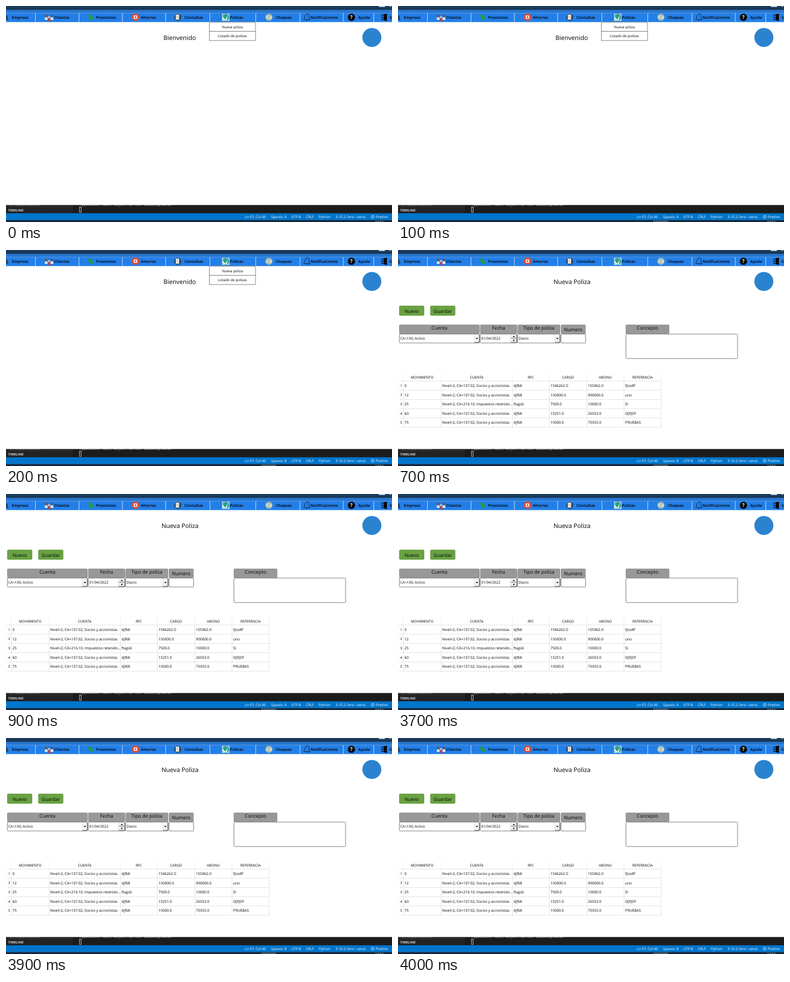
Animation of 690 by 388 pixels, one loop 8000 ms. Source, as an HTML page:

```html
<!DOCTYPE html>
<html lang="es">
<head>
<meta charset="utf-8">
<style>
html, body { margin: 0; width: 100%; height: 100%; overflow: hidden; background: #fff; }
svg { display: block; width: 690px; height: 388px; font-family: "Open Sans", "Noto Sans", sans-serif; text-rendering: geometricPrecision; }
</style>
</head>
<body>
<svg id="stage" viewBox="0 0 690 388"></svg>
<script>
const rect = (x, y, w, h, fill, extra = '') =>
  `<rect x="${x}" y="${y}" width="${w}" height="${h}" fill="${fill}" ${extra}/>`;
const circle = (x, y, r, fill, extra = '') => `<circle cx="${x}" cy="${y}" r="${r}" fill="${fill}" ${extra}/>`;
const path = (d, fill, extra = '') => `<path d="${d}" fill="${fill}" ${extra}/>`;
const line = (d, color, width = 1) => path(d, 'none', `stroke="${color}" stroke-width="${width}"`);
// y is the middle of the capital letters
const text = (x, y, size, str, extra = '', fill = '#000') =>
  `<text x="${x}" y="${y + size * 0.355}" font-size="${size}" fill="${fill}" ${extra}>${str}</text>`;
const mid = 'text-anchor="middle"';

function editor() {
  const mono = 'font-family="Noto Sans Mono, monospace"';
  const status = [[-3, '0'], [427, 'Ln 97, Col 60'], [474, 'Spaces: 8'], [510, 'UTF-8'],
    [536, 'CRLF'], [559, 'Python'], [589, "3.10.2 ('env': venv)"], [661, 'Prettier']];
  return rect(0, 350, 690, 24, '#1c1c1c') + rect(0, 350, 121, 24, '#222324') +
    text(7, 357, 6.2, 'x Process memory', '', '#999') +
    text(131, 357, 6.4, 'TypeError: dict  object is not subscriptable', mono, '#bbb') +
    line('M0 360.5H121', '#3c3c3c', .7) + line('M121 358V373', '#111') +
    text(4, 366.5, 5.8, 'TIMELINE', 'font-weight="700"', '#ddd') +
    rect(131.3, 361.5, 3, 9, 'none', 'stroke="#ddd" stroke-width=".8"') +
    rect(0, 372.3, 690, 12.5, '#0075cc') +
    status.map(([x, s]) => text(x, 378.7, 6.35, s, 'font-weight="500"', '#fff')).join('') +
    circle(655.5, 378.7, 2.7, 'none', 'stroke="#fff" stroke-width=".7"') + line('M653.6 380.6L657.4 376.8', '#fff', .7) +
    rect(0, 384.5, 690, 4, '#10263c') + text(660, 388.3, 6, '10:51', '', '#ddd');
}

function icons() {
  const person = (x, y, skin, coat) =>
    circle(x, y, 2, skin) + path(`M${x - 2.8} ${y + 7}q0-5 2.8-5t2.8 5z`, coat);
  return path('M0 16l2 1v2l2 1-1 2 1 3H0z', '#24405c') +
    person(72, 18, '#6b4a3c', '#d8e6f3') + person(82, 18, '#6b4a3c', '#d8e6f3') + person(77, 20, '#e8b89b', '#c23f3f') +
    path('M146 16q6-1 8 3l3 3-2 3q-6-1-7-4z', '#22a34a') + line('M146 16l8 7', '#13703a', .8) +
    circle(231.5, 20, 6.7, '#e2492f') + rect(228.5, 17, 6, 6, '#fff') + rect(230, 18.5, 3, 3, '#e2492f') +
    circle(307, 20.3, 6.3, '#30414f') + rect(303.5, 15.5, 6, 9, '#f3f3f3') + line('M305 18h3M305 20h3M305 22h3', '#777', .6) +
    rect(386, 14, 13.5, 13, '#a9d3e6') + circle(392.7, 20.5, 6, '#2aa18b') + path('M388 17q0 7 5 7l3-7-1 8q-6 2-8-3z', '#fff') +
    circle(470, 20.3, 6.3, '#a9bcb0') + rect(465.5, 18, 9, 4.5, '#e9eadc') + line('M467 19.5h6M467 21h4', '#4b8a83', .7) +
    line('M532 24.5q2-2 2-5t4-5 4 5 2 5zM536.5 25q1.5 2 3 0M538 14.5v-1.5', '#152c4a', 1) +
    circle(617.5, 20.3, 6.5, '#080808') + text(617.5, 20.3, 9, '?', mid + ' font-weight="700"', '#fff') +
    path('M675 15l6-1.5v13.5l-6-1.5z', '#0b0b0b') + line('M675 16h-3v2.5M672 22v2.5h3M670.5 20.3h4', '#0b0b0b', 1.2);
}

function navbar() {
  const items = [[10.5, 'Empresa'], [86, 'Clientes'], [161, 'Prestamos'], [241, 'Ahorros'], [319, 'Consultas'],
    [400.5, 'Polizas'], [482, 'Cheques'], [544.5, 'Notificaciones'], [629.5, 'Ayuda'], [685.5, 'Salir']];
  const dividers = [52.5, 130.5, 208, 285.5, 364.5, 446.5, 525.5, 603, 657.5];
  return rect(0, 0, 690, 7, '#193a59') + rect(666.5, -1, 11, 2.6, '#e8eef4') + line('M685 0l2 1.5 2-1.5', '#dfe7ef', .8) +
    rect(0, 7, 690, 6, '#2876cf') + rect(0, 12.8, 690, 16.2, '#237fe8') +
    line('M0 12.8H690M0 28.7H690', '#7db1ec', .6) +
    dividers.map(x => line(`M${x} 12.8V29`, '#d5e7fb', .9)).join('') + icons() +
    items.map(([x, s]) => text(x, 21, 6.8, s, 'font-weight="700"', '#071426')).join('');
}

function welcome() {
  const option = (y, s) => rect(363.5, y, 82.5, 16.5, '#fff', 'stroke="#777" stroke-width=".9"') +
    text(404.7, y + 8.6, 6.3, s, mid);
  return text(310.5, 57.3, 11.1, 'Bienvenido', mid) + option(29, 'Nueva poliza') + option(45.5, 'Listado de polizas');
}

function form() {
  const button = (x, w, s) => rect(x, 100, w, 18, '#69a244', 'rx="2.5"') + text(x + w / 2, 109.5, 8.5, s, mid);
  const field = (x, w, s, { value = '', h = 16, headWidth = w, y = 140.4 } = {}) =>
    rect(x, 134, headWidth, 17, '#989898', 'rx="2"') + text(x + headWidth / 2, y, 8.6, s, mid) +
    rect(x + .4, 151, w - .4, h, '#fff', 'rx="1.5" stroke="#707070" stroke-width=".9"') +
    text(x + 2, 159, 6.45, value);
  const arrow = (x, y, dir) => path(`M${x - 2.2} ${y}h4.4l-2.2 ${2.5 * dir}z`, '#111');
  // raised button: light left edge, dark right and bottom edges
  const raised = (x, y, w, h) => rect(x, y, w, h, '#f4f4f4') +
    line(`M${x} ${y}v${h}`, '#ccc', .7) + line(`M${x} ${y + h}h${w}v${-h}`, '#444', .9);
  return text(311, 57.3, 11.1, 'Nueva Poliza', mid) + button(2, 45, 'Nuevo') + button(57.5, 45, 'Guardar') +
    field(2, 144, 'Cuenta', { value: 'CA=100, Activo' }) + field(146.7, 66.3, 'Fecha', { value: '01/04/2022' }) +
    field(213.5, 76.5, 'Tipo de poliza', { value: 'Diario' }) + field(291, 44.5, 'Numero', { y: 142.5 }) +
    field(407, 200, 'Concepto', { h: 44, headWidth: 78 }) +
    raised(136.5, 152, 8.7, 14) + raised(280.5, 152, 8.7, 14) +
    raised(201.5, 152, 10.7, 6.8) + raised(201.5, 159.2, 10.7, 6.8) +
    arrow(141, 158, 1) + arrow(285, 158, 1) + arrow(207, 156.5, -1) + arrow(207, 161.5, 1);
}

function table() {
  const xs = [9.5, 77, 204.5, 270.5, 337.5, 404, 470.5];
  const heads = ['MOVIMIENTO', 'CUENTA', 'RFC', 'CARGO', 'ABONO', 'REFERENCIA'];
  const partners = 'Nivel=2, CA=107.02, Socios y accionistas';
  const rows = [
    ['0', partners, 'djf68', '1546262.0', '155962.0', 'fjssdlf'],
    ['12', partners, 'djf68', '150000.0', '900000.0', 'uno'],
    ['25', 'Nivel=2, CA=216.10, Impuestos retenido...', 'ftags6', '7500.0', '10000.0', 'SI'],
    ['60', partners, 'djf68', '15251.0', '26553.0', 'DJFJDF'],
    ['75', partners, 'djf68', '15000.0', '75555.0', 'PRUEBAS']];
  const top = 235.3, step = 16.6;
  let out = xs.map(x => line(`M${x} 221V${top}`, '#ececec', .8) + line(`M${x} ${top}V318.3`, '#dcdcdc', .8)).join('');
  for (let i = 0; i <= rows.length; i++) out += line(`M1 ${top + i * step}H470.5`, '#dcdcdc', .8);
  heads.forEach((s, c) => out += text((xs[c] + xs[c + 1]) / 2, 229.2, 6.35, s, mid));
  rows.forEach((row, r) => {
    const y = top + (r + .5) * step;
    out += text(4, y, 6.2, r + 1);
    row.forEach((s, c) => out += text(xs[c] + 2, y, 6.5, s));
  });
  return out;
}

const stage = document.getElementById('stage');
stage.innerHTML = editor() + rect(0, 29, 690, 328.5, '#fff') + navbar() +
  circle(654, 56.5, 17, '#2b83cf') +
  `<g id="welcome">${welcome()}</g><g id="entry">${form()}${table()}</g>` +
  rect(456, 385.5, 27, 3, '#4a5c6e', 'id="task"');

const show = (id, on) => document.getElementById(id).setAttribute('visibility', on ? 'visible' : 'hidden');

function frame() {
  const t = performance.now() % 8000;
  show('welcome', t < 700);
  show('entry', t >= 700);
  show('task', t >= 100);
  requestAnimationFrame(frame);
}
frame();
</script>
</body>
</html>
```
